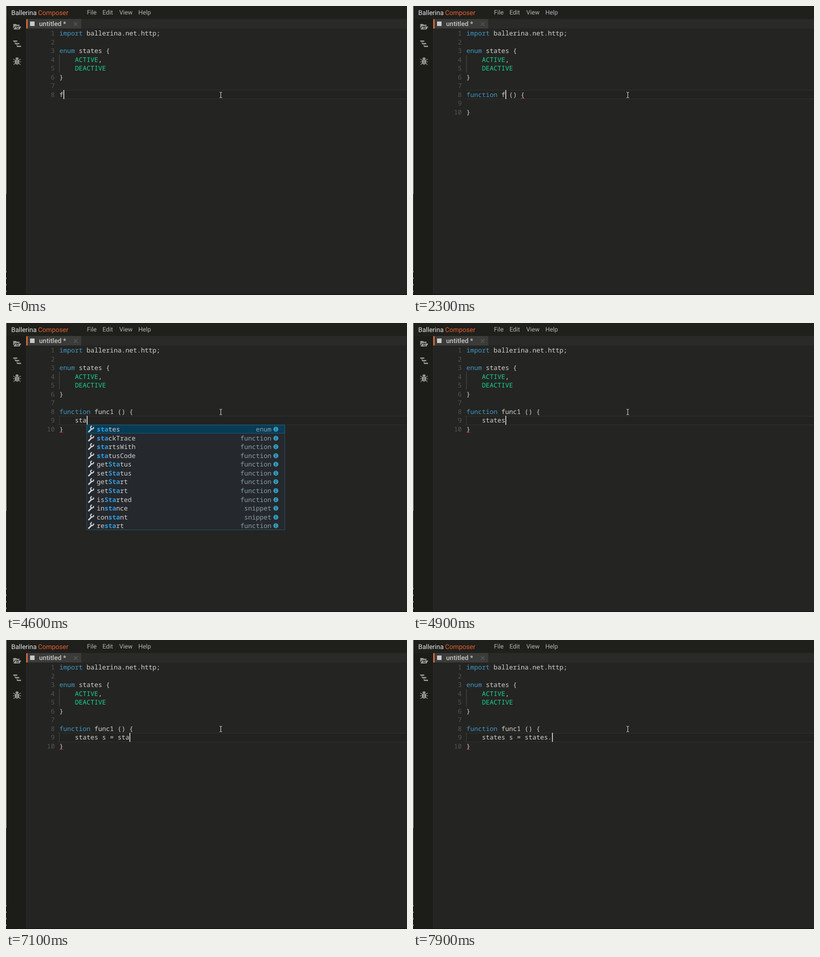
An HTML page for the animation above (8 s loop, 800x578 px).

```html
<!DOCTYPE html>
<html lang="en">
<head>
<meta charset="utf-8">
<title>Code editor</title>
<style>
  html, body { margin: 0; width: 100%; height: 100%; overflow: hidden; background: #242422; }
  svg { display: block; width: 800px; height: 578px; }
  text { white-space: pre; text-rendering: geometricPrecision; }
  .ui { font-family: Roboto, sans-serif; font-size: 12.3px; fill: #b4b4b4; }
  .brand { font-size: 13.1px; }
  .mono { font-family: "Noto Sans Mono", "DejaVu Sans Mono", monospace; font-size: 12.92px; fill: #d4d4d0; }
  .num { fill: #545552; text-anchor: end; }
  .key { fill: #4098c4; }
  .val { fill: #17d596; }
  .hit { fill: #2e9de4; font-weight: 700; }
  .meta { fill: #88a0ab; text-anchor: end; }
  .wave { fill: none; stroke: #d32b2b; stroke-width: 1; }
  .icon { fill: #9a9a98; }
</style>
</head>
<body>
<svg viewBox="0 0 800 578">
  <rect width="800" height="578" fill="#242422"/>
  <rect width="800" height="26" fill="#1f1f1c"/>
  <rect y="26" width="40" height="552" fill="#1c1c19"/>
  <rect x="40" y="26" width="760" height="19" fill="#2a2a29"/>
  <rect x="40" y="45" width="1" height="533" fill="#2a2a28"/>
  <rect x="40" y="26" width="110" height="19" fill="#3b3b3a"/>
  <rect x="40.500" y="26.500" width="2.500" height="18.500" fill="#e8703a"/>
  <rect y="576.500" width="800" height="1.500" fill="#191218"/>
  <rect width="1" height="376" fill="#b0b0b0"/>
  <path d="M.5 376V530" stroke="#4a4a4a"/>
  <path d="M.5 530V576" stroke="#b0b0b0" stroke-dasharray="3 10"/>

  <text class="ui brand" x="10.500" y="18" style="fill:#e6e6e6">Ballerina</text>
  <text class="ui brand" x="64" y="18" style="fill:#e8602c">Composer</text>
  <text class="ui" x="161.500" y="17">File</text>
  <text class="ui" x="192.500" y="17">Edit</text>
  <text class="ui" x="226" y="17">View</text>
  <text class="ui" x="264" y="17">Help</text>
  <rect x="48" y="31" width="9" height="9" fill="#c9c9c9"/>
  <text class="ui" x="66" y="40" style="font-size:13.2px;font-weight:500;fill:#c6c6c6">untitled *</text>
  <path d="M135.500 32.500l7 7m0-7l-7 7" stroke="#575757" stroke-width="1.700"/>

  <g class="icon">
    <path d="M14.500 36h5.500l1.500 1.500H27V40H18l-3.500 5z"/>
    <path d="M18.500 41H30.500L27 47H15z"/>
    <circle cx="22.500" cy="43.400" r="1.900" fill="none" stroke="#1c1c19"/>
    <path d="M24 44.800l1.500 1.500" stroke="#1c1c19"/>
    <path d="M14.500 69h8v2.500h-8zM18 74h8.500v2.500H18zM22 79.500h8V82h-8z"/>
    <path d="M18 71.500V75m4 1.500V81" stroke="#9a9a98"/>
    <ellipse cx="22" cy="111.800" rx="4.200" ry="5.700"/>
    <path d="M18.800 106a3.200 3.200 0 0 1 6.400 0z"/>
    <path d="M14.500 106l4.500 3M29.500 106l-4.500 3M14 111.500h16M15 117.500l4-3.500M29 117.500l-4-3.500" fill="none" stroke="#9a9a98" stroke-width="1.200"/>
    <path d="M22 108v9" stroke="#1c1c19" stroke-width=".8"/>
  </g>

  <g id="active">
    <rect x="103" width="697" height="18" fill="#222220"/>
    <path d="M103 .5H800M103 17.500H800" stroke="#2f2f2d"/>
  </g>
  <rect id="word" x="176" y="169" width="39" height="16" fill="#2b2b29"/>
  <rect id="select" x="176" y="168.300" width="31" height="17.600" fill="#3a4044"/>
  <path d="M106.500 98V133" stroke="#484946"/>
  <path id="guide" d="M106.500 186V203.500" stroke="#40413e"/>
  <g id="code"></g>
  <path id="waveTop" class="wave"/>
  <path id="waveEnd" class="wave"/>
  <rect id="caret" width="1.500" height="18" fill="#ececec"/>
  <g id="popup"></g>
  <path d="M426 172.500q2.500 0 2.500 1.200q0-1.200 2.500-1.200M428.500 173V183M426 183.500q2.500 0 2.500-1.200q0 1.200 2.500 1.200" fill="none" stroke="#e4e4e4"/>
</svg>

<script>
const LOOP = 8000, LEFT = 106.5, CHAR = 7.752, ROW = 17.56, TOP = 45.4;
const $ = id => document.getElementById(id);
const rowTop = n => TOP + (n - 1) * ROW;
const baseline = n => Math.round(rowTop(n) + 13.6);
const colX = n => LEFT + n * CHAR;
const span = (cls, s) => `<tspan class="${cls}">${s}</tspan>`;
const text = (cls, x, y, s) => `<text class="${cls}" x="${x}" y="${y}">${s}</text>`;

const snippet = [["function", "snippet"]];
const matches = [
  ["states", "enum"], ["stackTrace", "function"], ["startsWith", "function"],
  ["statusCode", "function"], ["getStatus", "function"], ["setStatus", "function"],
  ["getStart", "function"], ["setStart", "function"], ["isStarted", "function"],
  ["instance", "snippet"], ["constant", "snippet"], ["restart", "function"]
];

// Each step overrides the fields of the one before it; wave is [column, length].
const steps = [
  { at: 0, head: "f", body: "", row: 8, col: 1, full: false, wave: null, end: false, list: null },
  { at: 400, head: "fu", col: 2 },
  { at: 500, head: "fun", col: 3 },
  { at: 600, wave: [0, 3] },
  { at: 700, list: snippet, hit: "fun" },
  { at: 1000, head: "name", full: true, col: 13, list: null, select: true },
  { at: 1400, wave: null },
  { at: 1700, head: "", col: 9, select: false },
  { at: 2100, head: "f", col: 10, wave: [14, 1] },
  { at: 2400, head: "fu", col: 11, wave: null },
  { at: 2500, head: "fun", col: 12 },
  { at: 2700, head: "func", col: 13 },
  { at: 2900, head: "func1", col: 14 },
  { at: 3400, row: 9, col: 4, word: true },
  { at: 4000, body: "s", col: 5, word: false },
  { at: 4300, body: "st", col: 6, end: true },
  { at: 4400, body: "sta", col: 7 },
  { at: 4600, list: matches, hit: "sta" },
  { at: 4900, body: "states", col: 10, list: null },
  { at: 5500, body: "states ", col: 11 },
  { at: 5900, body: "states s", col: 12 },
  { at: 6100, body: "states s ", col: 13 },
  { at: 6200, body: "states s =", col: 14 },
  { at: 6400, body: "states s = ", col: 15 },
  { at: 6700, body: "states s = s", col: 16 },
  { at: 7000, body: "states s = st", col: 17 },
  { at: 7100, body: "states s = sta", col: 18 },
  { at: 7300, list: matches },
  { at: 7700, body: "states s = states", col: 21, list: null },
  { at: 7900, body: "states s = states.", col: 22 }
];
for (let i = 1; i < steps.length; i++) steps[i] = { ...steps[i - 1], ...steps[i] };

function codeLines(s) {
  const lines = [
    span("key", "import") + " ballerina.net.http;", "",
    span("key", "enum") + " states {",
    "    " + span("val", "ACTIVE") + ",",
    "    " + span("val", "DEACTIVE"),
    "}", ""
  ];
  if (s.full) lines.push(span("key", "function") + ` ${s.head} () {`, "    " + s.body, "}");
  else lines.push(s.head);
  return lines;
}

function wave(col, length, y) {
  let d = `M${colX(col)} ${y}`;
  for (let i = 0; i < length * CHAR / 2; i++) d += `l2 ${i % 2 ? 1.5 : -1.5}`;
  return d;
}

const wrench = (x, y) =>
  `<path d="M${x} ${y + 5}l5.500-5.500" stroke="#d4d4d4" stroke-width="2.600" stroke-linecap="round"/>` +
  `<path d="M${x + 9.500} ${y - 4.500}a3 3 0 1 1-3-2" fill="none" stroke="#d4d4d4" stroke-width="2.200"/>`;

function popup(s) {
  if (!s.list) return "";
  const x = colX(s.col) - .2, y = rowTop(s.row + 1), w = 396, h = s.list.length * ROW;
  let out = `<rect x="${x}" y="${y}" width="${w}" height="${h}" fill="#25282c"/>` +
    `<rect x="${x + .5}" y="${y + .5}" width="${w - 1}" height="${ROW - 1}" fill="#063c56" stroke="#1d5876"/>`;
  s.list.forEach(([name, kind], i) => {
    const base = baseline(s.row + 1 + i), mid = base - 4.5;
    const label = name.replace(new RegExp(s.hit, "i"), m => span("hit", m));
    out += wrench(x + 4.5, mid) + text("mono", x + 20.5, base, label) +
      text("mono meta", x + 369, base, kind) +
      `<circle cx="${x + 377.8}" cy="${mid}" r="5" fill="#359ab8"/>` +
      `<path d="M${x + 377.8} ${mid - 3}v1.400m0 1v3.400" stroke="#12394a" stroke-width="1.300"/>`;
  });
  return out + `<rect x="${x + .5}" y="${y + .5}" width="${w - 1}" height="${h - 1}" fill="none" stroke="#27536b"/>`;
}

const show = (id, on) => $(id).setAttribute("visibility", on ? "visible" : "hidden");

function draw(s) {
  $("code").innerHTML = codeLines(s).map((line, i) => {
    const y = baseline(i + 1);
    return text("mono num", 97.2, y, i + 1) + text("mono", LEFT, y, line);
  }).join("");
  $("active").setAttribute("transform", `translate(0 ${Math.round(rowTop(s.row))})`);
  $("caret").setAttribute("x", colX(s.col) + .4);
  $("caret").setAttribute("y", rowTop(s.row) - .2);
  $("waveTop").setAttribute("d", s.wave ? wave(...s.wave, 185.5) : "");
  $("waveEnd").setAttribute("d", s.end ? wave(0, 1, 219.5) : "");
  show("word", s.word);
  show("select", s.select);
  show("guide", s.row === 9);
  $("popup").innerHTML = popup(s);
}

let current;
function tick() {
  const t = performance.now() % LOOP;
  const step = steps.findLast(s => s.at <= t);
  if (step !== current) draw(current = step);
  requestAnimationFrame(tick);
}
tick();
</script>
</body>
</html>
```
